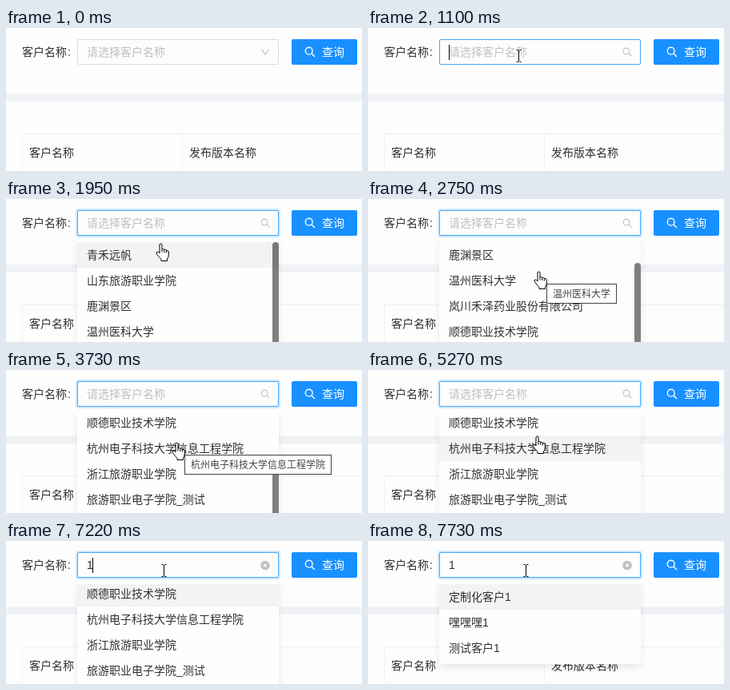
These frames come from a looping animation (445 by 179 pixels, 8000 ms). An HTML page:

```html
<!DOCTYPE html>
<html lang="zh-CN">
<head>
<meta charset="utf-8">
<title>客户查询</title>
<style>
  html, body { margin: 0; width: 100%; height: 100%; overflow: hidden; background: #fdfdfd; }
  body { position: relative; font: 14px/32px "Liberation Sans", "Noto Sans CJK SC", "Noto Sans CJK", sans-serif; color: #303030; }
  body * { position: absolute; box-sizing: border-box; white-space: nowrap; }
  svg { overflow: visible; }
  svg * { position: static; }
  .band { left: 0; top: 82px; width: 100%; height: 10px; background: #f0f2f5; }
  .table { left: 20px; top: 132px; width: 500px; height: 80px; border: 1px solid #f0f0f0; }
  .split { left: 199px; top: 0; width: 1px; height: 80px; background: #f0f0f0; }
  .btn { left: 357px; top: 14px; width: 82px; height: 32px; border-radius: 2px; background: #1890ff; color: #fff; }
  .field { left: 89px; top: 14px; width: 252px; height: 32px; border: 1px solid #d9d9d9; border-radius: 2px; background: #fdfdfd; }
  .field span { left: 11px; top: -1px; }
  #hint { color: #bfbfbf; }
  #caret { top: 21px; width: 1px; height: 19px; background: #000; }
  .icon { left: 318px; top: 24px; width: 12px; height: 12px; }
  #drop { left: 89px; top: 50px; width: 252px; border-radius: 2px; background: #fefefe; transform-origin: 0 0;
    box-shadow: 0 4px 8px rgba(0,0,0,.09); }
  #view { left: 0; top: 4px; width: 252px; bottom: 4px; overflow: hidden; }
  #view div { left: 0; width: 252px; height: 32px; padding-left: 12px; }
  #thumb { right: 0; top: 4px; width: 8px; height: 128px; border-radius: 4px; background: rgba(0,0,0,.5); }
  #tip { left: 223px; top: 106px; height: 25px; padding: 0 7px; border: 1px solid #444; background: #fff; color: #444; font-size: 12px; line-height: 24px; }
</style>
</head>
<body>
<span style="left:20px;top:14px">客户名称</span><span style="left:77px;top:14px">:</span>
<div class="band"></div>
<div class="table"><div class="split"></div></div>
<span style="left:29px;top:140px">客户名称</span>
<span style="left:229px;top:140px">发布版本名称</span>
<div class="btn">
  <svg style="left:16px;top:9px" width="14" height="14" fill="none" stroke="#fff" stroke-width="1.4"><circle cx="5.7" cy="5.7" r="4.4"/><path d="M8.9 8.9L13 13"/></svg>
  <span style="left:38px">查询</span>
</div>
<div class="field" id="field"><span id="hint">请选择客户名称</span><span id="typed">1</span></div>
<svg class="icon" id="chevron" fill="none" stroke="#bfbfbf" stroke-width="1.1"><path d="M1.4 2.6L6 9L10.6 2.6"/></svg>
<svg class="icon" id="search" fill="none" stroke="#bfbfbf" stroke-width="1.1"><circle cx="5" cy="5" r="3.9"/><path d="M7.9 7.9L11.4 11.4"/></svg>
<svg class="icon" id="clear"><circle cx="6" cy="6.5" r="5.8" fill="#bfbfbf"/><path d="M4 4.5L8 8.5M8 4.5L4 8.5" stroke="#fff" stroke-width="1.1"/></svg>
<div id="caret"></div>
<div id="drop"><div id="view"></div><i id="thumb"></i></div>
<div id="tip"></div>
<svg id="arrow" width="12" height="19"><path d="M.5 .8V15.5L4 12.2L6.3 17.5L8.6 16.5L6.3 11.4H11Z" fill="#fff" stroke="#000"/></svg>
<svg id="beam" width="7" height="16" fill="none" stroke="#000"><path d="M.5 .5H2.5L3.5 1.5L4.5 .5H6.5M3.5 1V15M.5 15.5H2.5L3.5 14.5L4.5 15.5H6.5"/></svg>
<svg id="hand" width="17" height="23" fill="#fff" stroke="#000" stroke-linejoin="round"><path d="M5 2Q6.5 -.3 8 2V7.8Q9.8 6.8 10.8 8.4Q12.4 7.6 13.4 9.3Q15.8 8.8 16.3 11V15Q16.2 18 14.5 20V22.5H7V20.5Q4 17.5 1.2 13.2Q.5 11.5 2 11Q3.5 10.8 5 13Z"/><path d="M8 7.8V11.5M10.8 8.4V12M13.4 9.3V12.4" fill="none"/></svg>
<script>
const LOOP = 8000;
const $ = id => document.getElementById(id);
const show = (id, on) => { $(id).style.visibility = on ? 'visible' : 'hidden'; };
const clamp = x => Math.max(0, Math.min(1, x));

const ALL = ['青禾远帆', '山东旅游职业学院', '鹿渊景区', '温州医科大学', '岚川禾泽药业股份有限公司',
  '顺德职业技术学院', '杭州电子科技大学信息工程学院', '浙江旅游职业学院', '旅游职业电子学院_测试'];
const FOUND = ['定制化客户1', '嘿嘿嘿1', '测试客户1'];

// time, x, y of the pointer hot spot
const PATH = [[220, 118, 140], [320, 152, 100], [400, 182, 58], [450, 188, 42], [570, 188, 35],
  [1949, 188, 35], [1950, 193, 55], [2250, 213, 90], [5220, 213, 90], [5570, 197, 37]];
const SCROLL = [[2270, 0], [2420, 64], [2849, 64], [2850, 164]];
const BLINK = [1100, 1620, 2150, 2700, 3220, 3730, 4300, 4820, 5350, 5880, 6420, 6950, 7220, 7730];
const TYPE = 7220, FILTER = 7270;

function track(keys, t) {
  const i = keys.findIndex(k => k[0] > t);
  if (i < 0) return keys[keys.length - 1].slice(1);
  if (i === 0) return keys[0].slice(1);
  const a = keys[i - 1], b = keys[i], f = (t - a[0]) / (b[0] - a[0]);
  return a.slice(1).map((v, j) => v + (b[j + 1] - v) * f);
}

const rows = ALL.map(() => {
  const row = document.createElement('div');
  $('view').append(row);
  return row;
});

function drawList(t) {
  const filtered = t >= FILTER;
  const names = filtered ? FOUND : ALL;
  const scroll = filtered ? 0 : track(SCROLL, t)[0];
  const active = filtered || t < 2220 ? 0 : t < 5270 ? 1 : t < 5320 ? 6 : 5;
  rows.forEach((row, i) => {
    row.textContent = names[i] || '';
    row.style.top = Math.round(32 * i - scroll) + 'px';
    row.style.background = names[i] && i === active ? '#f3f3f3' : 'none';
  });
  const open = 1 - (1 - clamp((t - 1180) / 250)) ** 3;
  const drop = $('drop').style;
  drop.height = (filtered ? 104 : 264) + 'px';
  drop.opacity = open;
  drop.transform = `scaleY(${0.8 + 0.2 * open})`;
  $('thumb').style.top = 4 + Math.round(0.41 * scroll) + 'px';
  $('thumb').style.display = t < 4870 ? 'block' : 'none';
}

function drawField(t) {
  const hover = clamp((t - 440) / 300), ring = clamp((t - 1100) / 300);
  const mix = (a, b) => Math.round(a + (b - a) * hover);
  $('field').style.borderColor = `rgb(${mix(217, 64)},${mix(217, 169)},${mix(217, 255)})`;
  $('field').style.boxShadow = `0 0 0 2px rgba(24,144,255,${0.2 * ring})`;
  show('hint', t < TYPE);
  show('typed', t >= TYPE);
  show('chevron', t < 1100);
  show('search', t >= 1100 && t < TYPE);
  show('clear', t >= TYPE);
  show('caret', BLINK.filter(b => b <= t).length % 2);
  $('caret').style.left = (t < TYPE ? 101 : 108) + 'px';
}

function drawTip(t) {
  const first = t >= 2750 && t < 2850, second = t >= 3400 && t < 5270;
  $('tip').textContent = ALL[first ? 3 : 6];
  show('tip', first || second);
}

function drawPointer(t) {
  const [x, y] = track(PATH, t);
  const kind = y < 47 ? 'beam' : t > 1200 && y >= 54 ? 'hand' : 'arrow';
  const spot = { beam: [3, 8], hand: [6, 0], arrow: [0, 0] };
  for (const id in spot) {
    show(id, t >= 220 && id === kind);
    $(id).style.left = Math.round(x) - spot[id][0] + 'px';
    $(id).style.top = Math.round(y) - spot[id][1] + 'px';
  }
}

function draw(now) {
  const t = now % LOOP;
  // motion advances in 50 ms steps; both offsets keep the jumps on time
  const step = offset => Math.floor((t - offset) / 50) * 50 + offset;
  drawField(t);
  drawList(t < 2600 ? step(20) : t);
  drawTip(t);
  drawPointer(t < 1900 || t > 5000 ? step(20) : step(0));
  requestAnimationFrame(() => draw(performance.now() - start));
}

const start = performance.now();
draw(0);
</script>
</body>
</html>
```
